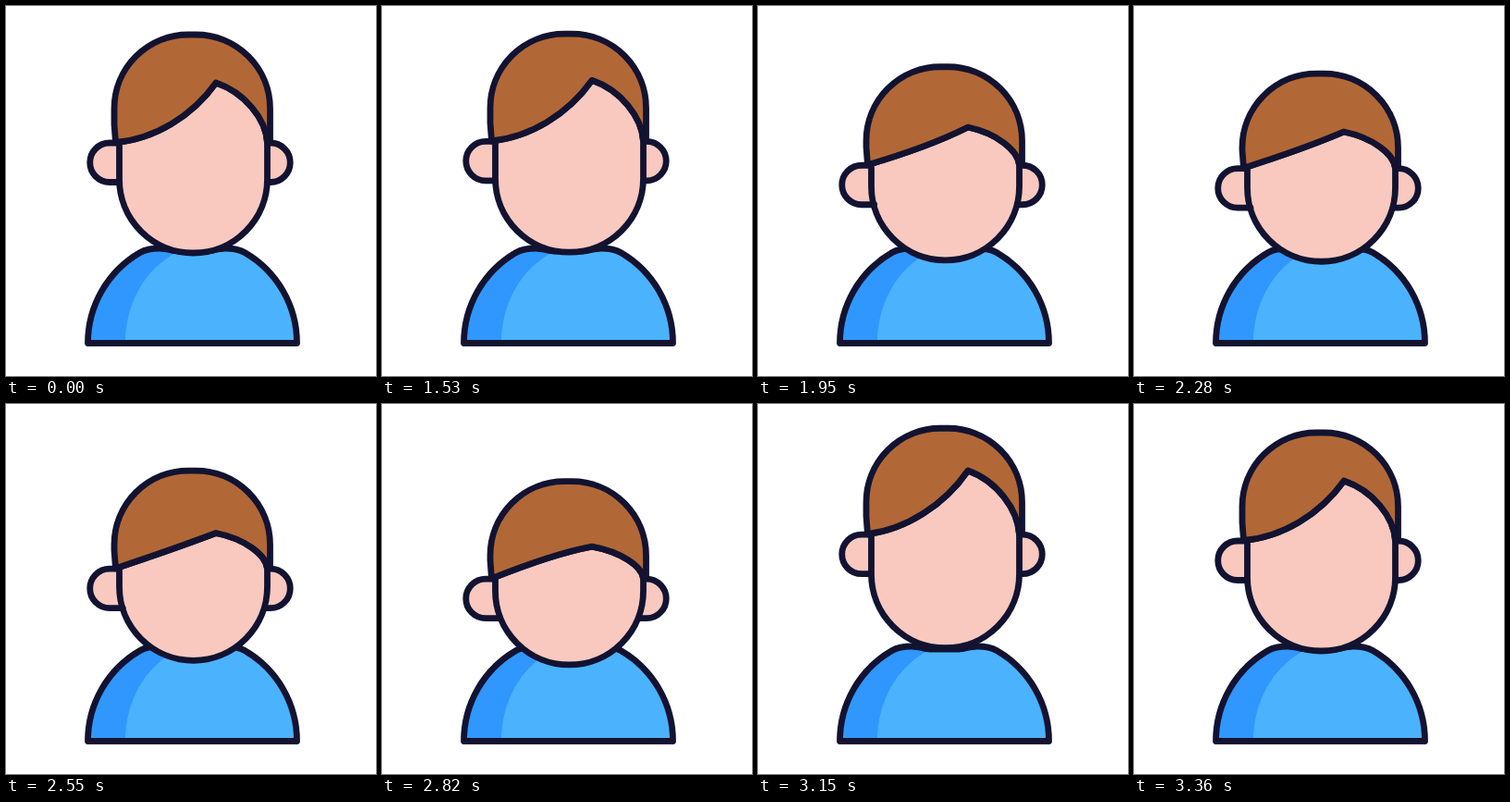
Recreate the animation shown at these times as an HTML page. Size 400 by 400 pixels, loop 3390 ms.

```html
<!DOCTYPE html>
<html lang="en">
<head>
<meta charset="utf-8">
<title>Nodding figure</title>
<style>
  html, body { margin: 0; width: 100%; height: 100%; overflow: hidden; background: #fff; }
  svg { display: block; width: 100vw; height: 100vh; }
  .line { stroke: #121331; stroke-width: 6.8; stroke-linejoin: round; stroke-linecap: round; }
  .skin { fill: #f9c9c0; }
  .hair { fill: #b26836; }
</style>
</head>
<body>
<svg viewBox="0 0 400 400">
  <clipPath id="torso">
    <path id="body" d="M88.5 364.5A113 113 0 0 1 145 266.500C152 262.500 160 262 166 262C172 262 178 264 185 265H218C225 264 231 262 237 262C243 262 251 262.500 258 266.500A113 113 0 0 1 314.500 364.500Z"/>
  </clipPath>
  <use href="#body" fill="#4bb3fd"/>
  <path clip-path="url(#torso)" fill="#3097ff" d="M80 364.5V260H192Q189 264 185 266C150 284 129 322 129 364.5Z"/>
  <use href="#body" class="line" fill="none"/>
  <path id="ears" class="line skin"/>
  <path id="face" class="line skin"/>
  <circle id="nub" r="3.4" fill="#121331"/>
  <path id="hair" class="line hair"/>
</svg>
<script>
const LOOP = 3390, STEP = 30, LEAD = 12;
const inOut = u => (1 - Math.cos(Math.PI * u)) / 2;
const out = u => u * (2 - u);

// time, how far the head is bowed, easing towards it
const nod = [
  [1512, 0], [1680, -4, out], [2140, 57], [2400, 30.5],
  [2745, 57], [3190, -6], [3360, 0]
];

function bowAt(t) {
  const i = nod.findIndex(key => key[0] > t);
  if (i < 1) return 0;
  const [t0, from] = nod[i - 1], [t1, to, ease = inOut] = nod[i];
  return from + (to - from) * ease((t - t0) / (t1 - t0));
}

const el = id => document.getElementById(id);
const ears = el('ears'), face = el('face'), hair = el('hair'), nub = el('nub');

function draw(t) {
  // the face runs slightly ahead of the crown
  const bow = bowAt(t + LEAD), lift = Math.min(bow, 0), curve = Math.max(bow, 0) ** 2;
  const crown = 31 + bowAt(t);
  const ear = 148 + 0.26 * bow + 0.0106 * curve + lift;
  const tip = 83 + 1.05 * bow + 0.0066 * curve + lift;
  const jaw = 187 + 0.0057 * curve + lift * 0.6;
  const sag = 21 - 0.48 * Math.max(bow, 0);
  const low = ear + 42.5, drop = ear - tip;
  const fringe = x => `${x} ${tip + drop * (227 - x) / 109 + sag}`;
  const hairline =
    `C281 ${tip + drop * 0.6} 258 ${tip + drop * 0.16} 227 ${tip}` +
    `C${fringe(201)} ${fringe(160)} 118.5 ${ear - 0.5}Z`;

  ears.setAttribute('d',
    `M140 ${ear}H112A21.25 21.25 0 0 0 112 ${low}H140` +
    `M265 ${ear}H286A21.25 21.25 0 0 1 286 ${low}H265`);
  face.setAttribute('d',
    `M122.5 ${ear}V${jaw}A80 80 0 0 0 282.5 ${jaw}V${ear}${hairline}`);
  hair.setAttribute('d',
    `M118.5 ${ear - 0.5}L117 ${ear - 20}V${crown + 80}A80 80 0 0 1 197 ${crown}` +
    `H205.5A80 80 0 0 1 285.5 ${crown + 80}V${ear - 0.5}H282.5${hairline}`);
  nub.setAttribute('cx', 122 + 0.1 * bow);
  nub.setAttribute('cy', low);
}

const start = performance.now();
function tick() {
  const t = (performance.now() - start) % LOOP;
  draw(Math.floor(t / STEP) * STEP);
  requestAnimationFrame(tick);
}
tick();
</script>
</body>
</html>
```
